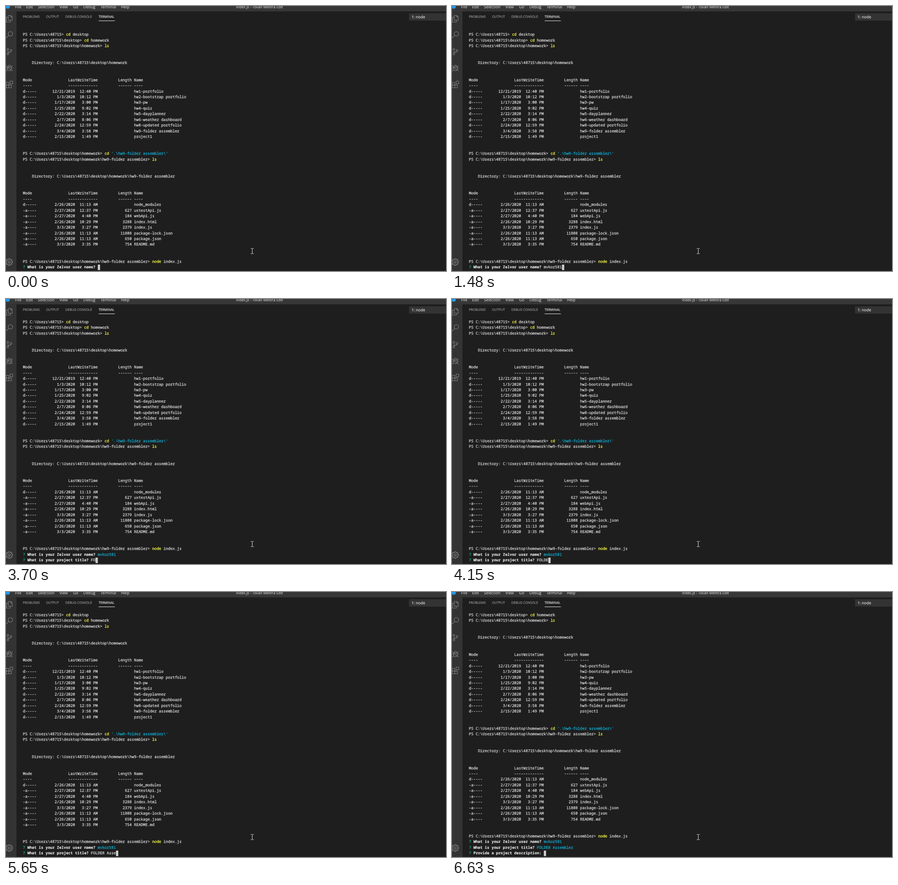
These frames come from a looping animation (964 px wide and 581 px high, 8000 ms). An HTML page:

```html
<!DOCTYPE html>
<html lang="en">
<head>
<meta charset="utf-8">
<title>Terminal session</title>
<style>
  html, body { margin: 0; width: 100%; height: 100%; overflow: hidden; background: #1e1e1e; }
  svg { display: block; width: 964px; height: 581px; }
  text { white-space: pre; text-rendering: geometricPrecision; color: #d0d0d0; }
  text, tspan { fill: currentColor; stroke: currentColor; }
  .ui { font-family: "Open Sans", "Noto Sans", sans-serif; stroke-width: .12; }
  .ui text { stroke-width: .12; }
  #term { font: 8.29px "Noto Sans Mono", "Liberation Mono", monospace; stroke-width: .32; }
  #term .cmd { color: #f5f543; }
  #term .str { color: #11a8cd; }
  #term .mark { color: #0dbc79; }
  #term .ask { color: #f0f0f0; font-weight: 700; stroke-width: .1; }
  .icon { fill: none; stroke: #858585; stroke-width: 1.6; }
</style>
</head>
<body>
<svg viewBox="0 0 964 581" xmlns="http://www.w3.org/2000/svg">
  <rect width="964" height="581" fill="#1e1e1e"/>
  <rect y="11" width="23" height="570" fill="#333"/>
  <rect width="964" height="11.7" fill="#373737"/>
  <circle cx="4" cy="1.5" r="4.5" fill="#1f9cf0"/>
  <g id="menu" class="ui" font-size="8.5"></g>
  <text class="ui" x="504" y="4.6" font-size="8.1">index.js - Tovan Meltira Edit</text>

  <g id="tabs" class="ui" font-size="7.15"></g>
  <rect x="203" y="32" width="35.5" height="1" fill="#e7e7e7"/>
  <rect x="883" y="16" width="81" height="16" fill="#333"/>
  <text class="ui" x="888.5" y="27" font-size="8.5" style="color:#f0f0f0">1: node</text>

  <g class="icon">
    <g transform="translate(-.25 20.2) scale(.646)">
      <path d="M8 1h9l4.5 4.5v11.7H8zM16.5 1v5h5M8 6.7H1.8v16.5h13.5v-6"/>
    </g>
    <g transform="translate(-.25 55.3) scale(.646)">
      <circle cx="15.2" cy="8.8" r="7.6"/>
      <path d="M9.8 14.2 1 23"/>
    </g>
    <g transform="translate(-.25 92.2) scale(.646)">
      <circle cx="6.8" cy="3.8" r="3"/>
      <circle cx="17.3" cy="8.2" r="3"/>
      <circle cx="6.8" cy="20.2" r="3"/>
      <path d="M6.8 6.8v10.4q.6-3 3.7-3h3q3 0 3.7-3"/>
    </g>
    <g transform="translate(-.25 127.8) scale(.646)">
      <path d="M6 9h12v6a6 7 0 0 1-12 0zM7.5 9a4.5 6 0 0 1 9 0M6 14H.5M18 14h5.5M6 10 2.5 6.5V4M18 10l3.5-3.5V4M7 18l-4 3v2.5M17 18l4 3v2.5M7 10l9.5 9.5"/>
    </g>
    <g transform="translate(-.25 164.2) scale(.646)">
      <path d="M14.2.8h9v9h-9zM.8 5.2h9v18H.8zM.8 14.2h18v9h-9"/>
    </g>
    <path id="gear" stroke-width="1.1"/>
    <circle cx="7" cy="561.3" r="2.3" stroke-width="1.1"/>
  </g>

  <g id="term"></g>
  <rect id="caret" y="567" width="5" height="12" fill="#ccc"/>
  <path d="M536.3 531.5h2.2l1 .8 1-.8h2.2M539.5 532v10.5M536.3 543h2.2l1-.8 1 .8h2.2"
        fill="none" stroke="#e6e6e6"/>
</svg>
<script>
const NS = 'http://www.w3.org/2000/svg';
const $ = id => document.getElementById(id);
const LOOP = 8000, LEFT = 37, CHAR = 4.974, PITCH = 12.44, BASE = 575.2, ROWS = 43;

function add(parent, tag, attrs, text) {
  const el = document.createElementNS(NS, tag);
  for (const k in attrs) el.setAttribute(k, attrs[k]);
  if (text) el.textContent = text;
  parent.appendChild(el);
  return el;
}

// Window chrome
[['File', 20], ['Edit', 44], ['Selection', 70], ['View', 117], ['Go', 147],
 ['Debug', 169.5], ['Terminal', 207], ['Help', 252]]
  .forEach(([s, x]) => add($('menu'), 'text', { x, y: 4.8 }, s));
[['PROBLEMS', 37], ['OUTPUT', 87.7], ['DEBUG CONSOLE', 130], ['TERMINAL', 203]]
  .forEach(([s, x], i) => add($('tabs'), 'text',
    { x, y: 26.2, style: 'color:' + (i === 3 ? '#f0f0f0' : '#a0a0a0') }, s));

// Gear outline: eight teeth, four corners each
const corners = [];
for (let i = 0; i < 8; i++) {
  [[-.3, 5.4], [-.2, 7.5], [.2, 7.5], [.3, 5.4]].forEach(([da, r]) => {
    const a = i * Math.PI / 4 + da;
    corners.push((7 + r * Math.cos(a)).toFixed(2) + ' ' + (561.3 + r * Math.sin(a)).toFixed(2));
  });
}
$('gear').setAttribute('d', 'M' + corners.join('L') + 'Z');

// Terminal history; a line is a list of [text, class]
const USER = 'mvkor581', TITLE = 'FOLDER Assembler';
const HOME = 'C:\\Users\\48715', WORK = HOME + '\\desktop\\homework', APP = WORK + '\\hw9-folder assembler';
const blank = [];
const shell = (dir, cmd, arg = '', cls = '') => [['PS ' + dir + '> '], [cmd, 'cmd'], [' ' + arg, cls]];
const entry = (mode, date, time, size, name) =>
  [[mode.padEnd(13) + date.padStart(10) + '  ' + time.padStart(8) + size.padStart(15) + ' ' + name]];
const listing = (dir, rows) => [
  blank, blank, [['    Directory: ' + dir]], blank, blank,
  [['Mode'.padEnd(20) + 'LastWriteTime' + 'Length'.padStart(15) + ' Name']],
  [['----'.padEnd(20) + '-'.repeat(13) + '------'.padStart(15) + ' ----']],
  ...rows.map(r => entry(...r.split('|'))), blank, blank
];
const ask = (q, answer, cls) => [['? ', 'mark'], [q + ' ', 'ask'], [answer, cls]];

const history = [
  shell(HOME, 'cd', 'desktop'),
  shell(HOME + '\\desktop', 'cd', 'homework'),
  shell(WORK, 'ls'),
  ...listing(WORK, [
    'd-----|12/21/2019|12:40 PM||hw1-portfolio',
    'd-----|1/3/2020|10:12 PM||hw2-bootstrap portfolio',
    'd-----|1/17/2020|3:00 PM||hw3-pw',
    'd-----|1/25/2020|9:02 PM||hw4-quiz',
    'd-----|2/22/2020|3:14 PM||hw5-dayplanner',
    'd-----|2/7/2020|8:06 PM||hw6-weather dashboard',
    'd-----|2/24/2020|12:59 PM||hw8-updated portfolio',
    'd-----|3/4/2020|3:58 PM||hw9-folder assembler',
    'd-----|2/15/2020|1:49 PM||project1'
  ]),
  shell(WORK, 'cd', "'.\\hw9-folder assembler\\'", 'str'),
  shell(APP, 'ls'),
  ...listing(APP, [
    'd-----|2/26/2020|11:13 AM||node_modules',
    '-a----|2/27/2020|12:37 PM|627|uxtestApi.js',
    '-a----|2/27/2020|4:40 PM|184|webApi.js',
    '-a----|2/26/2020|10:29 PM|3288|index.html',
    '-a----|3/3/2020|3:27 PM|2379|index.js',
    '-a----|2/26/2020|11:13 AM|11808|package-lock.json',
    '-a----|2/26/2020|11:13 AM|650|package.json',
    '-a----|3/3/2020|3:35 PM|754|README.md'
  ]),
  shell(APP, 'node', 'index.js')
];

// Each prompt: start time, question, answer, and the time of every key
const prompts = [
  { at: 0, q: 'What is your Zelvor user name?', answer: USER,
    keys: [680, 800, 950, 950, 1230, 1230, 1360, 1480] },
  { at: 1750, q: 'What is your project title?', answer: TITLE,
    keys: [3700, 3700, 3850, 3990, 4150, 4270, 4570, 4820,
           5360, 5490, 5650, 5810, 5930, 6050, 6210, 6360] },
  { at: 6630, q: 'Provide a project description:', answer: '', keys: [] }
];

const rows = Array.from({ length: ROWS }, (_, i) =>
  add($('term'), 'text', { x: LEFT, y: BASE - (ROWS - 1 - i) * PITCH }));

let shown = '';
function render(t) {
  const open = prompts.filter(p => t >= p.at);
  const now = open[open.length - 1];
  const typed = now.keys.filter(k => t >= k).length;
  const state = open.length + ':' + typed;
  if (state === shown) return;
  shown = state;

  const lines = history.concat(open.map(p =>
    p === now ? ask(p.q, p.answer.slice(0, typed)) : ask(p.q, p.answer, 'str')));
  rows.forEach((row, i) => {
    row.textContent = '';
    const line = lines[lines.length - ROWS + i] || blank;
    line.forEach(([s, cls]) => s && add(row, 'tspan', cls ? { class: cls } : {}, s));
  });
  $('caret').setAttribute('x', LEFT + (now.q.length + 3 + typed) * CHAR);
}

const start = performance.now();
function tick() {
  render((performance.now() - start) % LOOP);
  requestAnimationFrame(tick);
}
tick();
</script>
</body>
</html>
```
